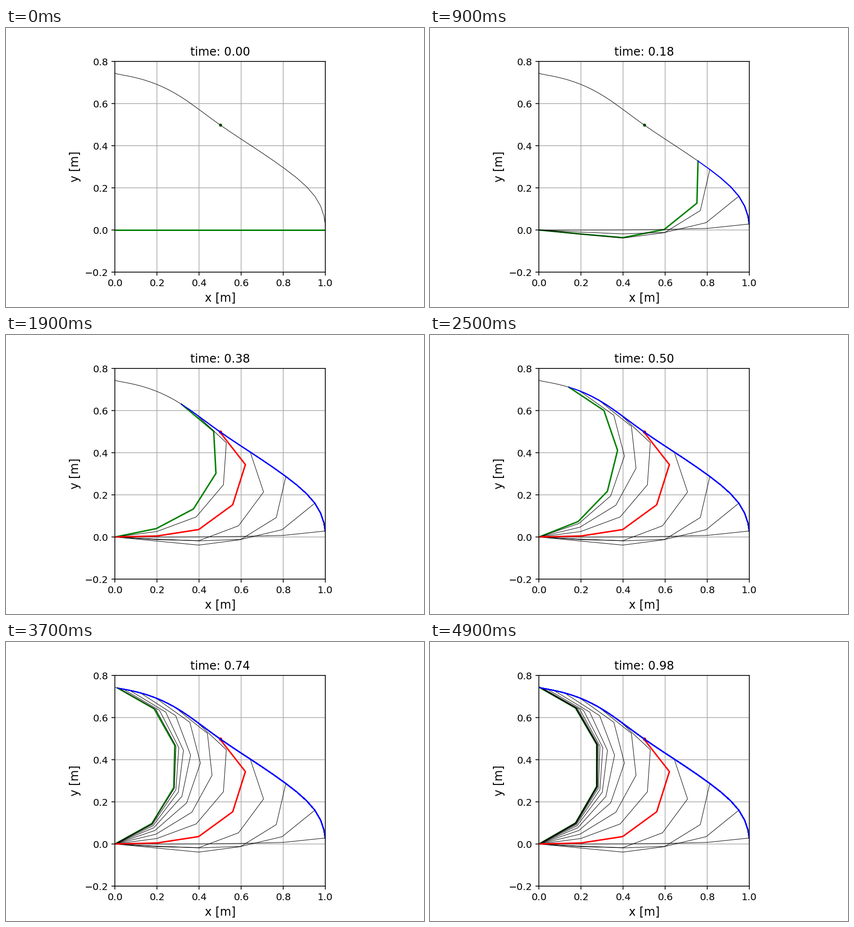
These frames come from a looping animation (864 by 576 pixels, 5000 ms). A matplotlib script:

```python
import numpy as np
import matplotlib.pyplot as plt
from matplotlib.animation import FuncAnimation

FRAMES, INTERVAL = 50, 100
LINK = 0.2
GOAL = 30.0
VIA_STEP = 14
SNAPSHOT_STEPS = range(2, FRAMES, 3)


def rise(t):
    """Ease from 0 to 1, shared by all joints."""
    return 1 - np.exp(-(t / 10) ** 2.6)


def swing(t, height, peak, sharpness, skew):
    """Lopsided bell that starts and ends at zero."""
    w = np.log(np.maximum(t, 1e-6) / peak)
    return height * np.exp(-sharpness * (np.exp(skew * w) - 1 - skew * w) / skew ** 2)


# Each joint's detour on its way to the goal: height, peak, sharpness, skew
DETOURS = [
    (-26.4, 12.7, 3.9, 1.0),
    (-20.2, 12.9, 4.7, 1.0),
    (0.0, 10.0, 1.0, 1.0),
    (11.8, 9.2, 3.0, -0.2),
    (34.0, 9.8, 2.55, 0.9),
]


def arm_joints(t):
    bends = np.array([GOAL * rise(t) + swing(t, *detour) for detour in DETOURS])
    angles = np.radians(np.cumsum(bends, axis=0)).T
    links = LINK * np.stack([np.cos(angles), np.sin(angles)], axis=-1)
    base = np.zeros((len(t), 1, 2))
    return np.concatenate([base, np.cumsum(links, axis=1)], axis=1)


arms = arm_joints(np.arange(FRAMES, dtype=float))
tips = arms[:, -1]

plt.rcParams.update({"font.family": "DejaVu Sans", "font.size": 10})
fig = plt.figure(figsize=(6, 4), dpi=144, facecolor="white")
ax = fig.add_axes([225.36 / 864, 0.125, 434.88 / 864, 0.755])
ax.set(xlim=(0, 1), ylim=(-0.2, 0.8))
ax.set_xticks(np.linspace(0, 1, 6))
ax.set_yticks(np.linspace(-0.2, 0.8, 6))
ax.set_xlabel("x [m]", fontsize=12)
ax.set_ylabel("y [m]", fontsize=12)
ax.grid(True)
title = ax.set_title("time: 0.00", fontsize=12)


def path(points, color, width, z):
    return ax.plot(points[:, 0], points[:, 1], color=color, lw=width, zorder=z)[0]


def dot(color, z):
    return ax.plot(0.5, 0.5, "o", color=color, ms=2.2, mew=1, zorder=z)[0]


dot("#006000", 2.0)
path(tips[1:], "black", 0.5, 2.05)
current = path(arms[0], "green", 1.5, 2.1)

# Each item appears at its step and stays until the loop restarts
timed = [(VIA_STEP, dot("red", 2.26))]
for step in SNAPSHOT_STEPS:
    color, width, z = ("red", 1.5, 2.25) if step == VIA_STEP else ("black", 0.5, 2.2)
    timed.append((step, path(arms[step], color, width, z)))
for step in range(3, FRAMES):
    timed.append((step, path(tips[2:step + 1], "blue", 1.0, 2.3)))


def update(i):
    title.set_text(f"time: {i * 0.02:.2f}")
    current.set_data(arms[i, :, 0], arms[i, :, 1])
    for start, artist in timed:
        artist.set_visible(i >= start)
    return [title, current]


update(0)
anim = FuncAnimation(fig, update, frames=FRAMES, interval=INTERVAL,
                     repeat=True, repeat_delay=0, blit=False)
plt.show()
```
